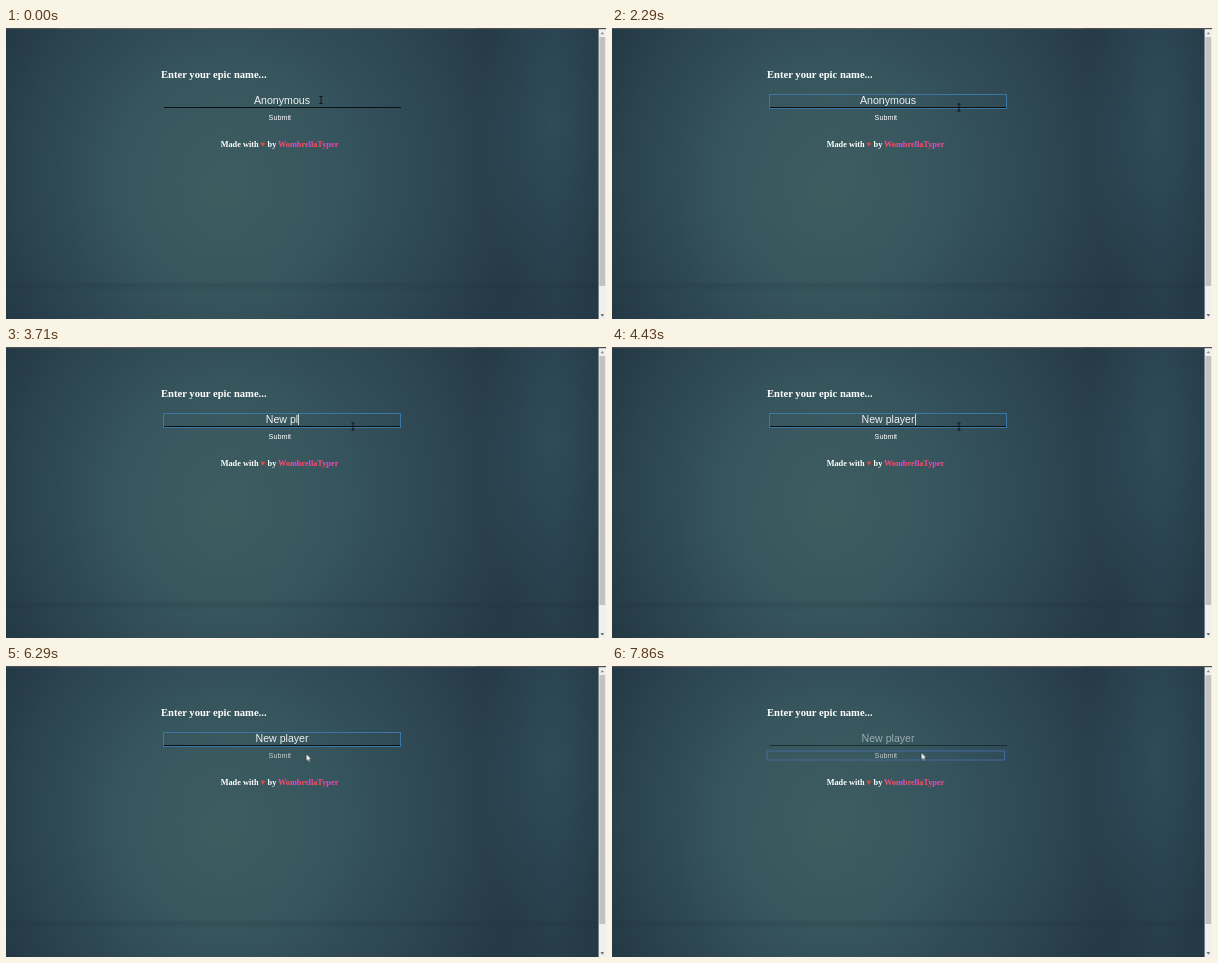
Animation of 600 by 291 pixels, one loop 8 s. Source, as an HTML page:

```html
<!DOCTYPE html>
<html lang="en">
<head>
<meta charset="utf-8">
<title>Enter your name</title>
<style>
  html, body { margin: 0; width: 100%; height: 100%; overflow: hidden; }

  #stage {
    position: relative;
    width: 600px;
    height: 291px;
    overflow: hidden;
    background:
      linear-gradient(#1b2c3800 254px, #1b2c3830 257px, #1b2c3800 264px),
      radial-gradient(ellipse 75px 190px at 545px 95px, #33525fb0, #33525f00),
      radial-gradient(ellipse 150px 190px at 215px 165px, #3f6060a0, #3f606000),
      radial-gradient(ellipse 300px 270px at 230px 145px, #385761, #34525c 40%, #2c455100),
      linear-gradient(90deg, #213542, #273d4a 20%, #283e4b 60%, #253946 80%, #273d4a 92%, #243845);
  }

  svg { position: absolute; inset: 0; }
  svg text { fill: #fff; }
  .serif { font-family: "Liberation Serif", "Times New Roman", serif; font-weight: 700; }
  .sans { font-family: "Liberation Sans", Arial, sans-serif; }
  .credit { font-size: 8.27px; }
  .credit .heart { fill: #dd4a3e; }
  .credit .author { fill: #ee5654; }
  .credit .ghost { fill: #4a45bd; }

  .field {
    position: absolute;
    left: 157.5px;
    top: 66px;
    width: 237px;
    height: 14px;
    animation: fade 8s step-end infinite;
  }
  .field::after {
    content: "";
    position: absolute;
    left: 0;
    right: 0;
    top: 13px;
    height: 1px;
    background: #0b1114;
  }
  .line {
    position: absolute;
    inset: 0;
    display: flex;
    justify-content: center;
    font-size: 10.6px;
    line-height: 12px;
    white-space: pre;
    color: #eef2f3;
  }
  .hint { animation: hint 8s step-end infinite; }
  .typed span { position: relative; }
  .typed span::before { content: ""; animation: type 8s step-end infinite; }
  .caret {
    position: absolute;
    left: 100%;
    top: 1px;
    width: 1px;
    height: 11px;
    background: #dfe6e8;
    opacity: 0;
    animation: blink 8s step-end infinite;
  }

  .ring { fill: none; stroke-width: 1; }
  .ring-field { stroke: #3c77a6; opacity: 0; animation: field-focus 8s step-end infinite; }
  .ring-button { stroke: #426a9f; opacity: 0; animation: button-focus 8s step-end infinite; }
  .submit { font-size: 7.2px; animation: hover 8s infinite; }

  .pointer { animation: move 8s linear infinite; }
  .beam { animation: beam 8s step-end infinite; }
  .arrow { opacity: 0; animation: arrow 8s step-end infinite; }

  @keyframes hint { 0% { opacity: 1 } 35.7%, 100% { opacity: 0 } }
  @keyframes type {
    0% { content: "" }
    35.7% { content: "N" }
    37.45% { content: "Ne" }
    41.05% { content: "New" }
    42.8% { content: "New " }
    44.6% { content: "New p" }
    46.35% { content: "New pl" }
    48.2% { content: "New pla" }
    51.7% { content: "New play" }
    53.5% { content: "New playe" }
    55.3%, 100% { content: "New player" }
  }
  @keyframes blink {
    0% { opacity: 0 }
    5.3% { opacity: .9 }
    10.7% { opacity: 0 }
    17.8% { opacity: .9 }
    24.9% { opacity: 0 }
    30.3% { opacity: .9 }
    62.4% { opacity: 0 }
    67.8% { opacity: .9 }
    74.9% { opacity: 0 }
    80.3% { opacity: .9 }
    87.4% { opacity: 0 }
    92.8% { opacity: .9 }
    94.6%, 100% { opacity: 0 }
  }
  @keyframes fade {
    0% { opacity: 1 }
    96.3% { opacity: .78 }
    98.2%, 100% { opacity: .55 }
  }
  @keyframes field-focus { 0% { opacity: 0 } 5.3% { opacity: 1 } 94.6%, 100% { opacity: 0 } }
  @keyframes button-focus { 0% { opacity: 0 } 94.6%, 100% { opacity: 1 } }
  @keyframes hover { 0%, 76.7% { opacity: 1 } 78.5%, 100% { opacity: .7 } }
  @keyframes move {
    0% { transform: translate(315px, 72px) }
    1.7% { transform: translate(315px, 72px); animation-timing-function: steps(5, start) }
    10.6% { transform: translate(336.5px, 72px) }
    23.2% { transform: translate(336.5px, 72px); animation-timing-function: steps(2, start) }
    26.8% { transform: translate(347px, 79.5px) }
    73.2% { transform: translate(347px, 79.5px); animation-timing-function: steps(4, start) }
    80.3% { transform: translate(300.3px, 87.8px); animation-timing-function: steps(4, start) }
    87.4%, 100% { transform: translate(309.3px, 86.5px) }
  }
  @keyframes beam { 0% { opacity: 1 } 74.9%, 100% { opacity: 0 } }
  @keyframes arrow { 0% { opacity: 0 } 74.9%, 100% { opacity: 1 } }
</style>
</head>
<body>
<div id="stage">
  <svg width="600" height="291" viewBox="0 0 600 291">
    <rect width="600" height="1.2" fill="#4b4f52"/>
    <rect x="52" width="418" height="1" fill="#5a5d5f"/>

    <rect x="592.6" y="1.2" width="7.4" height="290" fill="#f0f0f0"/>
    <rect x="593.4" y="9" width="5.8" height="249" fill="#c2c2c2"/>
    <path d="M594.5 6.2l1.8-2.2 1.8 2.2z" fill="#8a8a8a"/>
    <path d="M594.5 286.2l1.8 2.2 1.8-2.2z" fill="#505050"/>

    <text class="serif" x="155" y="50.3" font-size="10.6">Enter your epic name...</text>
    <text class="sans submit" x="273.8" y="91.6" text-anchor="middle">Submit</text>

    <g class="serif credit">
      <text x="214.7" y="118.5">Made with</text>
      <text class="heart" x="254.6" y="118.5">♥</text>
      <text x="261.6" y="118.5">by</text>
      <text class="ghost" x="272.7" y="119.1">WombrellaTyper</text>
      <text class="author" x="272" y="118.5">WombrellaTyper</text>
    </g>
  </svg>

  <div class="field sans">
    <div class="line hint">Anonymous</div>
    <div class="line typed"><span><i class="caret"></i></span></div>
  </div>

  <svg width="600" height="291" viewBox="0 0 600 291">
    <rect class="ring ring-field" x="157.5" y="66.5" width="237" height="14"/>
    <rect class="ring ring-button" x="155" y="85" width="237.5" height="9"/>
    <g class="pointer">
      <path class="beam" d="M-1.6-3.5H1.6M0-3.5V3.5M-1.6 3.5H1.6" fill="none" stroke="#0c1215" stroke-width=".9"/>
      <path class="arrow" d="M0 0V7.4L1.7 5.9 2.8 8.4 4.1 7.8 3 5.4H5.2Z" fill="#fff" stroke="#10181c" stroke-width=".5"/>
    </g>
  </svg>
</div>
</body>
</html>
```
